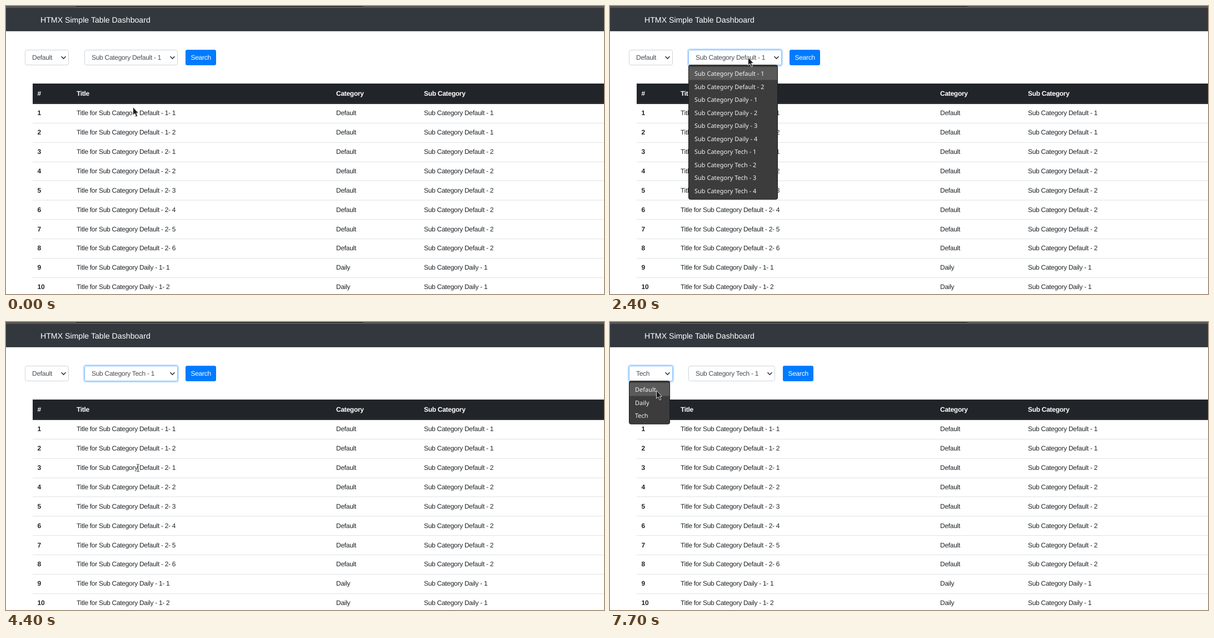
An HTML page for the animation above (8000 ms loop, 1076x520 px).

```html
<!DOCTYPE html>
<html lang="en">
<head>
<meta charset="utf-8">
<title>Table Dashboard</title>
<style>
  html, body { margin: 0; width: 100%; height: 100%; overflow: hidden; background: #fff; }
  svg { display: block; width: 1076px; height: 520px; }
  text { font: 12px "Liberation Sans", Arial, sans-serif; letter-spacing: -.29px; fill: #212529; text-rendering: geometricPrecision; white-space: pre; }
  .brand { font-size: 14.15px; letter-spacing: 0; fill: #fff; }
  .head { font-weight: bold; fill: #fff; }
  .num { font-weight: bold; }
  .value { fill: #495057; }
  .line { fill: #dee2e6; }
  .box { fill: #fff; stroke: #ced4da; }
  .ring { fill: none; stroke: #bfdeff; stroke-width: 2.3; }
  .focus .box { stroke: #80bdff; }
  .select:not(.focus) .ring { display: none; }
  .chevron { fill: none; stroke: #343a40; stroke-width: 1.6; }
  .button rect { fill: #007bff; }
  .button text { fill: #fff; }
  .panel { fill: #3c3c3c; stroke: #1c1c1c; }
  .mark { fill: #5a5a5a; }
  .menu text { font: 11px "Noto Sans", "Open Sans", sans-serif; letter-spacing: 0; fill: #f4f4f4; }
</style>
</head>
<body>
<svg viewBox="0 0 1076 520">
  <rect width="1076" height="5" fill="#555"/>
  <rect x="126" width="517" height="1" fill="#1c1c1c"/>
  <rect y="4" width="1076" height="1" fill="#2b2d2f"/>
  <rect y="5" width="1076" height="40.5" fill="#32383e"/>
  <rect y="44" width="1076" height="1" fill="#22272b"/>
  <text class="brand" x="62" y="30">HTMX Simple Table Dashboard</text>
  <g id="table"></g>
  <g id="form"></g>
  <g id="menus"></g>
  <g id="cursor">
    <path id="arrow" d="M0 0V14.5L3.3 11.6L5.8 17.4L8.2 16.4L5.8 10.8H9.8Z" fill="#1d1d1f" stroke="#fff" stroke-width=".8"/>
    <path id="beam" d="M-2.5 -6.5H-.8L0 -5.7L.8 -6.5H2.5M0 -5.7V5.7M-2.5 6.5H-.8L0 5.7L.8 6.5H2.5" fill="none" stroke="#222"/>
  </g>
</svg>
<script>
const LOOP = 8000, STEP = 100, ROW = 34.87, ITEM = 23.56;
const $ = id => document.getElementById(id);
const text = (x, y, s, cls = '') => `<text class="${cls}" x="${x}" y="${y}">${s}</text>`;
const range = (n, f) => Array.from({ length: n }, (_, i) => f(i));

// Table
const groups = [['Default', 1, 2], ['Default', 2, 6], ['Daily', 1, 2]];
const rows = groups.flatMap(([cat, sub, n]) =>
  range(n, i => ({ cat, sub: `Sub Category ${cat} - ${sub}`, item: i + 1 })));
const columns = [56.5, 127, 594, 752];

$('table').innerHTML =
  '<rect x="48" y="140" width="1028" height="37" fill="#212529"/>' +
  '<rect x="48" y="175" width="1028" height="1" fill="#32383e"/>' +
  ['#', 'Title', 'Category', 'Sub Category'].map((s, i) => text(columns[i], 162, s, 'head')).join('') +
  rows.map((r, i) => {
    const y = Math.round(197.4 + ROW * i);
    const cells = [i + 1, `Title for ${r.sub}- ${r.item}`, r.cat, r.sub];
    return cells.map((s, c) => text(columns[c], y, s, c ? '' : 'num')).join('') +
      `<rect class="line" x="48" y="${Math.round(210.8 + ROW * i)}" width="1028" height="1"/>`;
  }).join('');

// Form
const select = (id, x) => `<g class="select" id="${id}">
  <rect class="ring" x="${x - 1.1}" y="77.9" height="30.2" rx="4"/>
  <rect class="box" x="${x + .5}" y="79.5" height="27" rx="3"/>
  ${text(x + 13, 97, '', 'value')}
  <path class="chevron" d="M-4 -2L0 2L4 -2"/></g>`;

$('form').innerHTML = select('cat', 34) + select('sub', 141) +
  '<g class="button" id="search"><rect y="79" width="55" height="28" rx="3"/>' +
  text(9.5, 97, 'Search') + '</g>';

function setSelect(id, x, width, value, focus) {
  const g = $(id);
  g.classList.toggle('focus', focus);
  g.querySelector('.ring').setAttribute('width', width + 2.2);
  g.querySelector('.box').setAttribute('width', width - 1);
  g.querySelector('text').textContent = value;
  g.querySelector('.chevron').setAttribute('transform', `translate(${x + width - 9.5} 93)`);
}

// Menus
const numbered = (cat, n) => range(n, i => `Sub Category ${cat} - ${i + 1}`);
const menus = [
  { x: 34, width: 74, open: 6300, close: LOOP, chosen: 2, items: ['Default', 'Daily', 'Tech'] },
  { x: 141, width: 161, open: 2300, close: 4400, chosen: 0,
    items: [...numbered('Default', 2), ...numbered('Daily', 4), ...numbered('Tech', 4)] }
];

$('menus').innerHTML = menus.map(({ x, width, items }) => `<g class="menu">
  <rect class="panel" x="${x + .5}" y="106.5" width="${width - 1}" height="${items.length * ITEM + 7}" rx="3"/>
  <rect class="mark" x="${x + 1}" width="${width - 2}" height="${ITEM}"/>
  ${items.map((s, i) => text(x + 11, Math.round(126 + ITEM * i), s)).join('')}</g>`).join('');
const menuNodes = document.querySelectorAll('.menu');

// Pointer gestures: first step, last step, x, y
const moves = [
  [0, 0, 229, 183],
  [600, 800, 55, 100], [900, 1000, 146, 105], [1100, 1500, 228, 92],
  [1800, 1800, 250, 103], [2100, 2100, 249, 93],
  [2500, 3100, 260, 191], [3200, 4000, 251, 271],
  [4400, 4400, 238, 264], [4500, 4700, 177, 213], [4900, 5200, 52, 102],
  [5600, 5700, 188, 100], [5900, 5900, 128, 96], [6200, 6300, 101, 95],
  [6600, 6900, 77, 148], [7600, 7700, 84, 124]
];

function pointer(t) {
  let x = 0, y = 0;
  for (const [start, end, toX, toY] of moves) {
    if (t < start) break;
    const k = Math.min(1, (t - start + STEP) / (end - start + STEP));
    x += (toX - x) * k;
    y += (toY - y) * k;
  }
  return [x, y];
}

// The highlight runs slightly ahead of the drawn pointer
function marked(menu, t) {
  const y = pointer(Math.min(t + 2 * STEP, menu.close - STEP))[1];
  return y < 107 ? menu.chosen : Math.max(0, Math.floor((y - 110) / ITEM));
}

function render(t) {
  const swapped = t >= 4600;
  const subWidth = swapped ? 156 : 168;
  setSelect('cat', 34, 79, swapped ? 'Tech' : 'Default', t >= 6300);
  setSelect('sub', 141, subWidth, `Sub Category ${t < 4400 ? 'Default' : 'Tech'} - 1`, t >= 2300 && t < 6300);
  $('search').setAttribute('transform', `translate(${155 + subWidth} 0)`);

  menus.forEach((m, i) => {
    const open = t >= m.open && t < m.close;
    menuNodes[i].style.display = open ? '' : 'none';
    if (open) menuNodes[i].querySelector('.mark').setAttribute('y', 110 + ITEM * marked(m, t));
  });

  const beam = t === 4400;
  $('arrow').style.display = beam ? 'none' : '';
  $('beam').style.display = beam ? '' : 'none';
  const [x, y] = pointer(t);
  $('cursor').setAttribute('transform', `translate(${x - .5} ${y - .5})`);
}

const begin = performance.now();
let shown = -1;
function tick() {
  const t = Math.floor((performance.now() - begin) % LOOP / STEP) * STEP;
  if (t !== shown) render(shown = t);
  requestAnimationFrame(tick);
}
tick();
</script>
</body>
</html>
```
